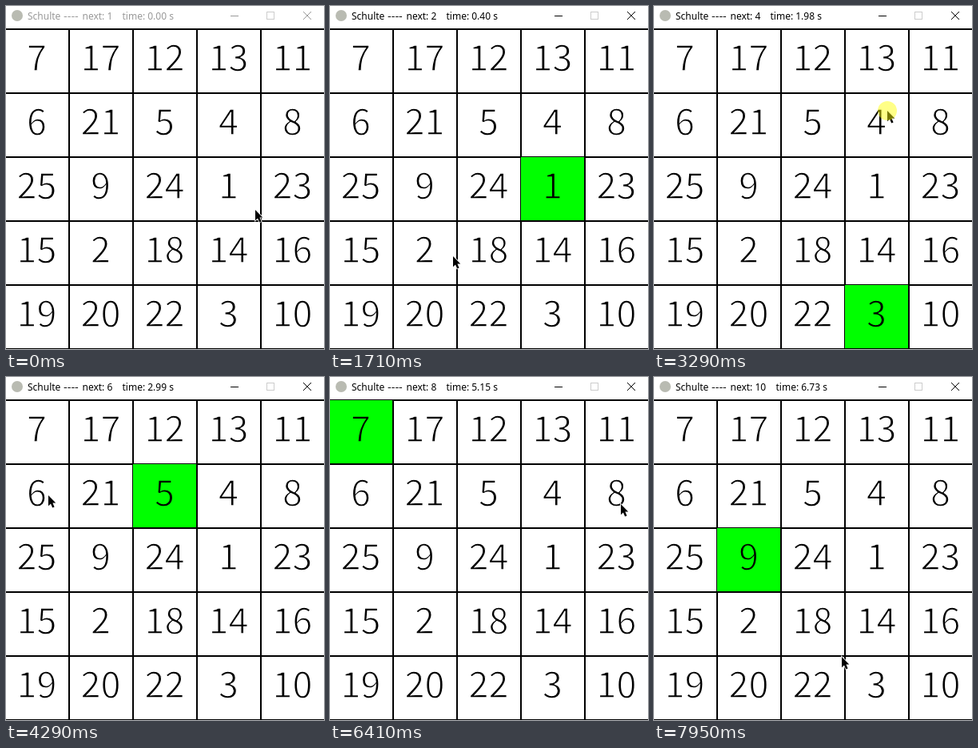
Animation, 398 px wide and 429 px high, one loop 8 s. Source, as an HTML page:

```html
<!DOCTYPE html>
<html lang="en">
<head>
<meta charset="utf-8">
<title>Schulte</title>
<style>
  html, body { margin: 0; width: 100%; height: 100%; overflow: hidden; background: #fff; }
  svg { display: block; width: 398px; height: 429px; }
  .bar { font: 12px "Noto Sans", "Open Sans", sans-serif; }
  .dash { font: 13px "DejaVu Sans", sans-serif; }
  /* the outline takes the cell colour and so thins the digits */
  .num { font: 300 45px "Noto Sans CJK SC", "Noto Sans CJK JP", Lato, sans-serif; text-anchor: middle; stroke-width: 1.3; }
  .crisp { shape-rendering: crispEdges; }
</style>
</head>
<body>
<svg id="stage" viewBox="0 0 398 429">
  <rect width="398" height="429" fill="#fff"/>
  <circle cx="14" cy="12" r="7" fill="#b9bbb2"/>
  <g id="bar" class="bar">
    <text x="27" y="17">Schulte</text>
    <text class="dash" x="72" y="17">----</text>
    <text id="next" x="95.5" y="17"></text>
    <text id="clock" y="17"></text>
    <rect class="crisp" x="281" y="12" width="10" height="1"/>
    <path id="close" d="M372 7l10 10M382 7l-10 10"/>
  </g>
  <rect class="crisp" x="326.5" y="7.5" width="9" height="9" fill="none" stroke="#ccc"/>
  <g id="lines" class="crisp"></g>
  <rect id="hit" class="crisp" width="79" height="79" fill="#0f0"/>
  <g id="nums"></g>
  <path id="mouse" d="M0 0V13.2L3 10.4L5.2 15.4L7.6 14.4L5.4 9.5H9.3Z" stroke="#fff" stroke-width="1.6" paint-order="stroke"/>
  <circle id="press" r="12" fill="#ff0" fill-opacity=".47"/>
</svg>
<script>
const LOOP = 8000, CELL = 80, TOP = 29;
const grid = [
  7, 17, 12, 13, 11,
  6, 21, 5, 4, 8,
  25, 9, 24, 1, 23,
  15, 2, 18, 14, 16,
  19, 20, 22, 3, 10
];
// the pointer's start, then one stop per click: time, x, y, sag of the way there
const stops = [
  [460, 312, 255],
  [1295, 296, 250],
  [1980, 123, 327],
  [2750, 303, 393],
  [3330, 292, 131],
  [3860, 211, 151],
  [4390, 53, 148],
  [5080, 48, 65],
  [6470, 364, 159, 95],
  [7230, 124, 241, 35],
  [8050, 235, 350]
];

const $ = id => document.getElementById(id);
const col = i => i % 5;
const row = i => Math.floor(i / 5);

function add(parent, tag, attrs, text = "") {
  const el = document.createElementNS("http://www.w3.org/2000/svg", tag);
  for (const k in attrs) el.setAttribute(k, attrs[k]);
  el.textContent = text;
  parent.append(el);
  return el;
}

for (let i = 0; i < 6; i++) {
  add($("lines"), "rect", { x: 0, y: TOP - 1 + CELL * i, width: 398, height: 2 });
  add($("lines"), "rect", { x: CELL * i - 2, y: TOP - 1, width: 2, height: 401 });
}
const nums = grid.map((n, i) => add($("nums"), "text", {
  class: "num", x: 38.5 + CELL * col(i), y: TOP + 52.2 + CELL * row(i)
}, n));

// the shown time gains slightly on the real one
function seconds(t) {
  const s = Math.max(0, t - 1303) / 1000;
  return s * (.994 + .0028 * s);
}

// eases to the next stop and waits there for the click
function pointer(t, done) {
  const [t0, x0, y0] = stops[done], [t1, x1, y1, sag = 0] = stops[done + 1];
  const u = Math.min(1, Math.max(0, (t - t0) / (t1 - t0) / .83));
  const e = u * u * (3 - 2 * u);
  return [x0 + (x1 - x0) * e, y0 + (y1 - y0) * e + sag * 4 * e * (1 - e)].map(Math.round);
}

function draw(t) {
  const done = stops.slice(1).filter(s => t >= s[0]).length;
  const ink = done ? "#000" : "#999";
  $("bar").setAttribute("fill", ink);
  $("close").setAttribute("stroke", ink);
  $("next").textContent = `next: ${done + 1}`;
  $("clock").textContent = `time: ${(Math.floor(seconds(t) * 100) / 100).toFixed(2)} s`;
  $("clock").setAttribute("x", done > 8 ? 152.5 : 145.5);

  const cell = grid.indexOf(done);
  $("hit").setAttribute("visibility", done ? "visible" : "hidden");
  $("hit").setAttribute("x", CELL * col(cell) - 1);
  $("hit").setAttribute("y", CELL * row(cell) + TOP);
  nums.forEach((el, i) => el.setAttribute("stroke", i === cell ? "#0f0" : "#fff"));

  const down = stops.slice(1).some(([c]) => t >= c - 50 && t < c + 60);
  $("press").setAttribute("visibility", down ? "visible" : "hidden");
  const at = `translate(${pointer(t, done)})`;
  $("mouse").setAttribute("transform", at);
  $("press").setAttribute("transform", at);
}

const start = performance.now();
function tick() {
  draw((performance.now() - start) % LOOP);
  requestAnimationFrame(tick);
}
tick();
</script>
</body>
</html>
```
